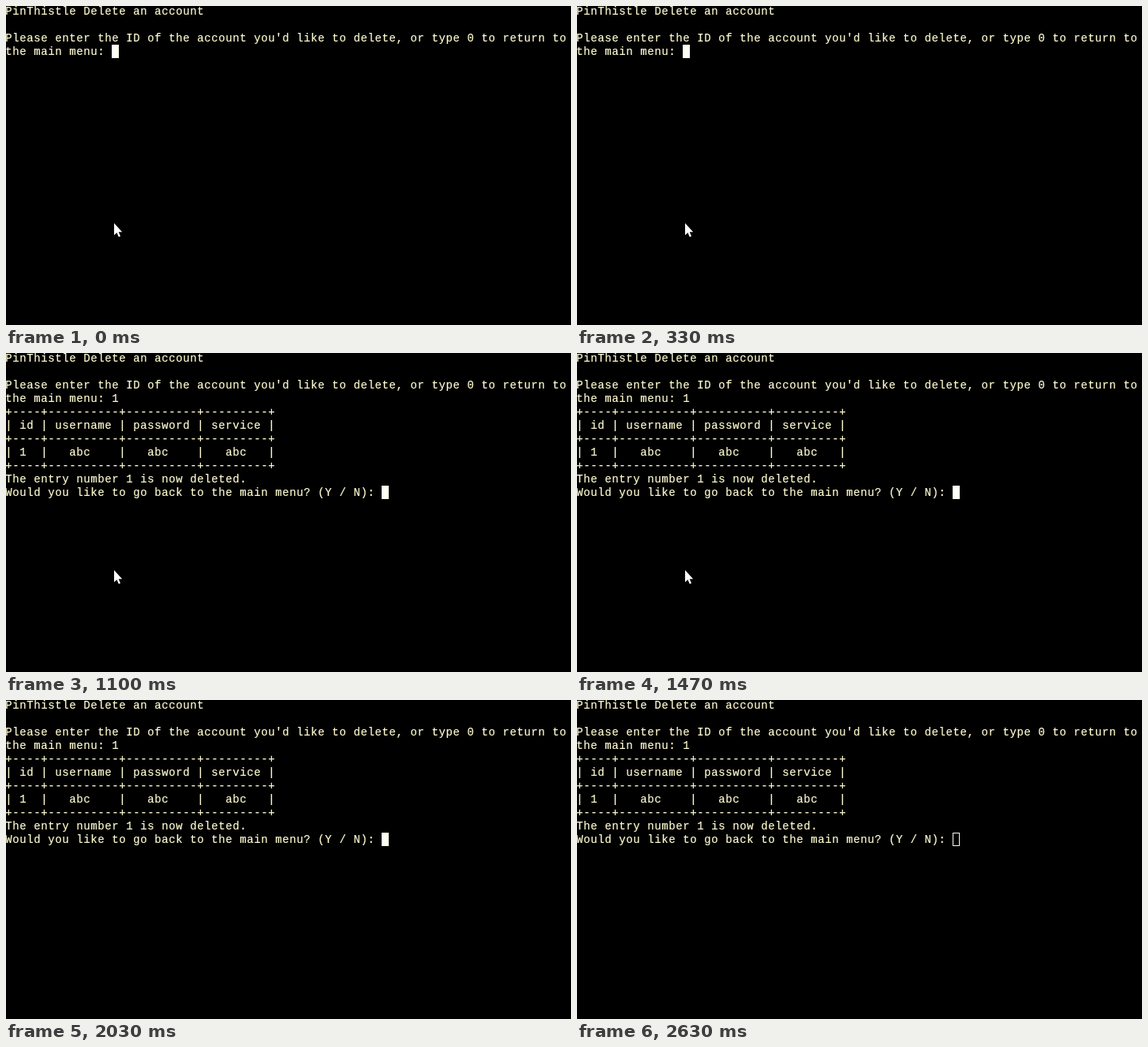
An HTML page for the animation above (2.66 s loop, 716x404 px).

```html
<!DOCTYPE html>
<html lang="en">
<head>
<meta charset="utf-8">
<title>Terminal: delete an account</title>
<style>
  html, body { margin: 0; width: 100%; height: 100%; overflow: hidden; background: #000; }
  svg { display: block; width: 716px; height: 404px; background: #000; }
  text {
    font: 14px "Courier New", "Liberation Mono", monospace;
    letter-spacing: 0.6px;
    fill: #fffbd0;
    stroke: #fffbd0;
    stroke-width: 0.2px;
    white-space: pre;
  }
</style>
</head>
<body>
<svg viewBox="0 0 716 404">
  <g id="screen"></g>
  <rect id="caret"/>
  <path id="pointer" fill="#fff" d="M137 275V290.2L140.4 287L142.8 292.5L145 291.6L142.7 286.2H147.2Z"/>
</svg>
<script>
const LOOP = 2660, TYPED = 670, ANSWERED = 1100, POINTER_GONE = 2030, BLURRED = 2630;
const CELL = 9, ROW = 17, LEFT = -1, TOP = -2;

const screen = document.getElementById('screen');
const caret = document.getElementById('caret');
const pointer = document.getElementById('pointer');

const rule = '+' + [4, 10, 10, 9].map(n => '-'.repeat(n) + '+').join('');
const prompt = 'the main menu: ';
const question = 'Would you like to go back to the main menu? (Y / N): ';
const intro = [
  'PinThistle Delete an account',
  '',
  "Please enter the ID of the account you'd like to delete, or type 0 to return to"
];
const answer = [
  rule,
  '| id | username | password | service |',
  rule,
  '| 1  |   abc    |   abc    |   abc   |',
  rule,
  'The entry number 1 is now deleted.',
  question
];

const rows = Array.from({ length: intro.length + 1 + answer.length }, (_, i) => {
  const row = document.createElementNS('http://www.w3.org/2000/svg', 'text');
  row.setAttribute('x', LEFT + 0.3);
  row.setAttribute('y', TOP + i * ROW + 13);
  return screen.appendChild(row);
});

function setAll(node, attrs) {
  for (const name in attrs) node.setAttribute(name, attrs[name]);
}

function placeCaret(col, row, focused) {
  const inset = focused ? 0 : 0.5;
  setAll(caret, {
    x: LEFT + col * CELL + inset,
    y: TOP + row * ROW + inset,
    width: CELL - 2 * inset,
    height: ROW - 2 * inset,
    fill: focused ? '#fffff4' : 'none',
    stroke: focused ? 'none' : '#fffff4'
  });
}

function draw(t) {
  const lines = [...intro, prompt + (t >= TYPED ? '1' : '')];
  if (t >= ANSWERED) lines.push(...answer);
  rows.forEach((row, i) => {
    const line = lines[i] || '';
    if (row.textContent !== line) row.textContent = line;
  });
  const last = lines.length - 1;
  placeCaret(lines[last].length, last, t < BLURRED);
  pointer.setAttribute('visibility', t < POINTER_GONE ? 'visible' : 'hidden');
}

let start = null;
function tick(now) {
  if (start === null) start = now;
  draw((now - start) % LOOP);
  requestAnimationFrame(tick);
}
draw(0);
requestAnimationFrame(tick);
</script>
</body>
</html>
```
